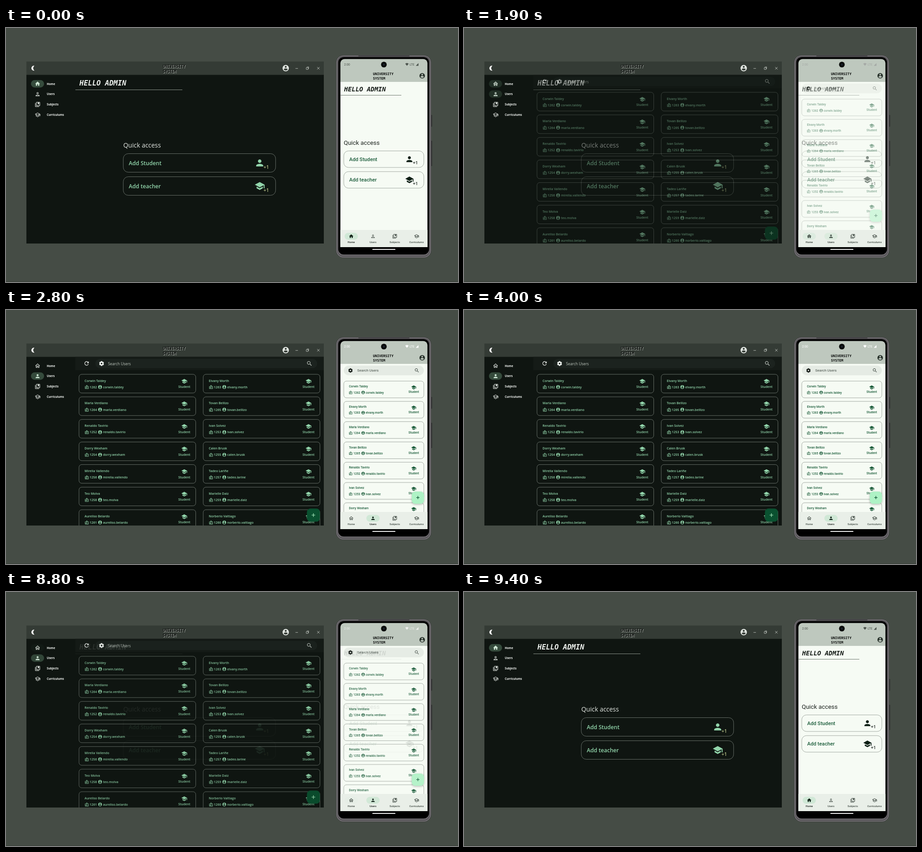
An HTML page with a canvas that plays this animation: 997 px wide and 561 px high, repeating every 9.5 s.

```html
<!DOCTYPE html>
<html lang="en">
<head>
<meta charset="utf-8">
<title>University System</title>
<style>
html, body { margin: 0; width: 100%; height: 100%; overflow: hidden; background: #454c45; }
canvas { display: block; width: 997px; height: 561px; }
</style>
</head>
<body>
<canvas id="stage"></canvas>
<script>
const W = 997, H = 561, LOOP = 9500, STEP = 100;
const dpr = window.devicePixelRatio || 1;
const SANS = '"Open Sans", "Noto Sans", sans-serif';
const ROBOTO = 'Roboto, sans-serif';
const MONO = '"DejaVu Sans Mono", monospace';

// Icons live in a 24-unit box and are filled with the even-odd rule.
const icons = {
  home: 'M10 20v-6h4v6h5v-8h3L12 3 2 12h3v8z',
  homeLine: 'M12 5.69l5 4.5V18h-2v-6H9v6H7v-7.81zM12 3L2 12h3v8h6v-6h2v6h6v-8h3z',
  person: 'M12 12c2.21 0 4-1.79 4-4s-1.79-4-4-4-4 1.79-4 4 1.79 4 4 4zm0 2c-2.67 0-8 1.34-8 4v2h16v-2c0-2.66-5.33-4-8-4z',
  personLine: 'M12 6c1.1 0 2 .9 2 2s-.9 2-2 2-2-.9-2-2 .9-2 2-2zm0 10c2.7 0 5.8 1.29 6 2H6c.23-.72 3.31-2 6-2zM12 4C9.79 4 8 5.79 8 8s1.79 4 4 4 4-1.79 4-4-1.79-4-4-4zm0 10c-2.67 0-8 1.34-8 4v2h16v-2c0-2.66-5.33-4-8-4z',
  books: 'M4 6H2v14c0 1.1.9 2 2 2h14v-2H4zM20 2H8c-1.1 0-2 .9-2 2v12c0 1.1.9 2 2 2h12c1.1 0 2-.9 2-2V4c0-1.1-.9-2-2-2zm0 14H8V4h12zM13 4h5v8l-2.5-1.5L13 12z',
  school: 'M5 13.18v4L12 21l7-3.82v-4L12 17zM12 3L1 9l11 6 9-4.91V17h2V9z',
  schoolLine: 'M12 3L1 9l4 2.18v6L12 21l7-3.82v-6l2-1.09V17h2V9zm6.82 6L12 12.72 5.18 9 12 5.28zM17 15.99l-5 2.73-5-2.73v-3.72L12 15l5-2.73z',
  account: 'M12 2a10 10 0 1 0 0 20 10 10 0 0 0 0-20zm0 3a3 3 0 1 1 0 6 3 3 0 0 1 0-6zm0 14.2c-2.5 0-4.71-1.28-6-3.22.03-1.99 4-3.08 6-3.08s5.97 1.09 6 3.08c-1.29 1.94-3.5 3.22-6 3.22z',
  search: 'M15.5 14h-.79l-.28-.27A6.5 6.5 0 1 0 13.73 14.43l.27.28v.79l5 4.99L20.49 19zM9.5 14a4.5 4.5 0 1 1 0-9 4.5 4.5 0 0 1 0 9z',
  refresh: 'M17.65 6.35A8 8 0 1 0 19.73 14h-2.08A6 6 0 1 1 16.22 7.78L13 11h7V4z',
  badge: 'M20 7h-5V4c0-1.1-.9-2-2-2h-2c-1.1 0-2 .9-2 2v3H4c-1.1 0-2 .9-2 2v11c0 1.1.9 2 2 2h16c1.1 0 2-.9 2-2V9c0-1.1-.9-2-2-2zM11 4h2v5h-2zM20 20H4V9h5c0 1.1.9 2 2 2h2c1.1 0 2-.9 2-2h5zM6 13h5v5H6zM14 13h4v1.5h-4zM14 16h4v1.5h-4z',
  moon: 'M15 3A9.3 9.3 0 1 0 15 21A11 11 0 0 1 15 3z',
  wifi: 'M12 21L1 7C7 1.5 17 1.5 23 7z',
  signal: 'M2 22h20V2z'
};
for (const key in icons) icons[key] = new Path2D(icons[key]);

const people = [
  ['Corwin Taldey', 1262], ['Elvany Morth', 1263],
  ['Marla Verdiano', 1264], ['Tovan Bellizo', 1265],
  ['Renaldo Tavirio', 1252], ['Ivan Solvez', 1253],
  ['Dorry Wexham', 1254], ['Calen Brusk', 1255],
  ['Mirelia Vallendo', 1256], ['Tadeo Lariñe', 1257],
  ['Teo Molva', 1258], ['Marielle Daiz', 1259],
  ['Aureliso Belardo', 1261], ['Norberio Valtiago', 1260]
];
const login = name => name.toLowerCase().replace(' ', '.').replace('ñ', 'n');
const tabs = [
  ['Home', 'home', 'homeLine'], ['Users', 'person', 'personLine'],
  ['Subjects', 'books', 'books'], ['Curriculums', 'school', 'schoolLine']
];

let ctx;

function sheet(canvas) {
  canvas.width = Math.round(W * dpr);
  canvas.height = Math.round(H * dpr);
  const c = canvas.getContext('2d');
  c.scale(dpr, dpr);
  return c;
}
function rect(x, y, w, h, color) {
  ctx.fillStyle = color;
  ctx.fillRect(x, y, w, h);
}
function box(x, y, w, h, r, fill, stroke, width = 0.8) {
  ctx.beginPath();
  ctx.roundRect(x, y, w, h, r);
  if (fill) { ctx.fillStyle = fill; ctx.fill(); }
  if (stroke) { ctx.strokeStyle = stroke; ctx.lineWidth = width; ctx.stroke(); }
}
function dot(x, y, r, color) {
  ctx.beginPath();
  ctx.arc(x, y, r, 0, Math.PI * 2);
  ctx.fillStyle = color;
  ctx.fill();
}
function line(color, width, ...pts) {
  ctx.beginPath();
  for (let i = 0; i < pts.length; i += 4) {
    ctx.moveTo(pts[i], pts[i + 1]);
    ctx.lineTo(pts[i + 2], pts[i + 3]);
  }
  ctx.strokeStyle = color;
  ctx.lineWidth = width;
  ctx.stroke();
}
function text(str, x, y, font, color, align = 'left') {
  ctx.font = font;
  ctx.fillStyle = color;
  ctx.textAlign = align;
  ctx.fillText(str, x, y);
}
function icon(name, cx, cy, size, color) {
  ctx.save();
  ctx.translate(cx - size / 2, cy - size / 2);
  ctx.scale(size / 24, size / 24);
  ctx.fillStyle = color;
  ctx.fill(icons[name], 'evenodd');
  ctx.restore();
}
function gear(cx, cy, size, color) {
  ctx.beginPath();
  ctx.arc(cx, cy, size * 0.24, 0, Math.PI * 2);
  ctx.strokeStyle = color;
  ctx.lineWidth = size * 0.2;
  ctx.stroke();
  for (let i = 0; i < 6; i++) {
    const a = i * Math.PI / 3 + Math.PI / 6, c = Math.cos(a) * size, s = Math.sin(a) * size;
    line(color, size * 0.23, cx + c * 0.26, cy + s * 0.26, cx + c * 0.41, cy + s * 0.41);
  }
}
function plus(cx, cy, r, color) {
  line(color, 1.2, cx - r, cy, cx + r, cy, cx, cy - r, cx, cy + r);
}
function clipped(x, y, w, h, r, draw) {
  ctx.save();
  ctx.beginPath();
  ctx.roundRect(x, y, w, h, r);
  ctx.clip();
  draw();
  ctx.restore();
}
function wordmark(x, y1, y2, size, color) {
  const small = `bold ${size}px ${MONO}`;
  text('UNIVERSITY', x, y1, small, color);
  text('SYSTEM', x, y2, small, color);
}

function quickCard(label, glyph, card, look) {
  const [x, y, w, h] = card;
  box(x, y, w, h, look.r, null, look.edge);
  text(label, x + 12, y + h / 2 + look.drop, look.font, look.ink);
  icon(glyph, look.iconX, y + h / 2, look.size, look.iconInk);
  text('+1', look.plusX, y + h / 2 + look.plusDrop, look.plusFont, look.plusInk);
}

function userCard(x, y, person, k) {
  box(x, y, k.w, k.h, 6, null, k.edge);
  const [name, id] = person;
  text(name, x + k.pad, y + k.row1, k.font, k.ink);
  icon('badge', x + k.badge, y + k.row2 - 2.5, k.small, k.ink);
  text(id, x + k.id, y + k.row2, k.font, k.ink);
  icon('account', x + k.acc, y + k.row2 - 2.5, k.small, k.ink);
  text(login(name), x + k.user, y + k.row2, k.font, k.ink);
  icon('school', x + k.right, y + k.capY, k.cap, k.ink);
  text('Student', x + k.right, y + k.role, k.font, k.ink, 'center');
}

function desktop(users) {
  const green = '#92d5ab', edge = '#7d867e';
  rect(45, 74, 656, 402, '#0f1511');
  rect(45, 74, 656, 29.5, '#343b35');
  icon('moon', 61, 88.8, 14, '#fff');
  wordmark(346.5, 88.7, 99.5, 8.3, '#b9c0b9');
  wordmark(345.7, 87.9, 98.7, 8.3, '#050706');
  icon('account', 617, 88.7, 17, '#dfe4df');
  line('#c0c6c0', 0.9, 638.5, 89.3, 644, 89.3, 686.3, 86.2, 691.7, 91.6, 691.7, 86.2, 686.3, 91.6);
  box(662.2, 87.4, 4.2, 4.2, 0.5, null, '#c0c6c0', 0.9);
  line('#c0c6c0', 0.9, 663.5, 86, 668, 86, 667.6, 86, 667.6, 90.5);

  tabs.forEach(([label, full, outline], i) => {
    const y = 123.2 + i * 22.85, on = i === (users ? 1 : 0);
    if (on) box(55, y - 8.2, 29, 16.4, 8.2, '#354b3c');
    icon(on ? full : outline, 69.7, y, 13, on ? '#d0e8d6' : '#e4e9e4');
    text(label, 90, y + 2.3, `700 6.2px ${SANS}`, '#f4f7f4');
  });

  if (!users) {
    text('HELLO ADMIN', 162, 127, `italic bold 15.6px ${MONO}`, '#eef2ee');
    line('#8b938a', 1, 153, 136.5, 389, 136.5);
    text('Quick access', 258.7, 263.7, `14px ${SANS}`, '#e4e9e4');
    const look = {
      r: 11, edge, drop: 5.3, font: `600 12.1px ${SANS}`, ink: green, iconX: 559.6, size: 23.5,
      iconInk: green, plusX: 568, plusDrop: 12.5, plusFont: `600 10.5px ${SANS}`, plusInk: '#b2bd85'
    };
    quickCard('Add Student', 'person', [258.7, 277.5, 336, 41], look);
    quickCard('Add teacher', 'school', [258.7, 328.5, 336, 41], look);
    return;
  }

  rect(153, 103.5, 548, 29.5, '#151b17');
  icon('refresh', 177.8, 118, 14, '#f0f4f0');
  box(197, 108, 489.5, 20.5, 10.2, '#1c231f');
  gear(210.8, 118.2, 13, '#f0f4f0');
  text('Search Users', 225, 121.9, `8.3px ${SANS}`, '#c0c9c0');
  icon('search', 669.3, 118.2, 14, '#c9d0c9');
  const k = {
    w: 257.5, h: 41.3, edge, ink: green, font: `600 7px ${SANS}`, pad: 12.3, row1: 16.5, row2: 30.7,
    badge: 17.3, id: 23.5, acc: 46.5, user: 53, small: 9.8, right: 232.2, cap: 13.8, capY: 15.4, role: 30.2
  };
  clipped(45, 133, 656, 343, 0, () => {
    people.forEach((p, i) => userCard(i % 2 ? 435 : 161, 142 + (i >> 1) * 49.85, p, k));
    box(663.7, 438.5, 28.8, 29, 8, '#0a5130');
    plus(678.1, 453, 4, '#aef2c5');
  });
}

function phone(users) {
  const ink = '#1c5d3b', dark = '#0d1f15', edge = '#8d958d';
  box(937, 192, 2.8, 26, 1, '#2b2c2c');
  box(937, 249, 2.8, 56, 1, '#2b2c2c');
  box(728, 60, 210, 447.5, 16, '#3c3b3d');
  box(728.8, 60.8, 208.4, 446, 15.5, '#817e82');
  box(730.3, 62, 205.4, 443.3, 14, '#4c4a4d');
  box(731.5, 63.2, 203, 440.3, 13, '#6a676b');
  box(732.8, 64.2, 200.4, 436, 12, '#000');
  box(777, 61.2, 113, 1.8, 0.8, '#353436');

  clipped(737.6, 68.5, 192, 415.5, [9, 9, 0, 0], () => {
    rect(737, 68, 193, 51, '#bec8be');
    rect(737, 119, 193, 327, '#f6fbf4');
    rect(737, 446, 193, 38, '#e9efe8');
    const status = users ? '#fff' : '#4b534c';
    text('2:00', 745.8, 83.1, `6.8px ${ROBOTO}`, status);
    icon('wifi', 884.4, 80.6, 8, status);
    text('LTE', 890.3, 83.1, `6.8px ${ROBOTO}`, status);
    icon('signal', 906.8, 80.5, 7.2, status);
    wordmark(809.5, 104.3, 114.2, 7.5, '#050706');
    icon('account', 918, 105.5, 14.6, '#29332c');

    if (users) phoneUsers(ink, edge);
    else phoneHome(ink, dark, edge);

    rect(737, 446, 193, 38, '#e9efe8');
    tabs.forEach(([label, full, outline], i) => {
      const x = 761.5 + i * 48, on = i === (users ? 1 : 0);
      if (on) box(x - 14.7, 452.5, 29.4, 15, 7.5, '#d0e8d6');
      icon(on ? full : outline, x, 460, 11.6, on ? dark : '#39433c');
      text(label, x, 475, `500 5.9px ${ROBOTO}`, on ? '#171d19' : '#3f4942', 'center');
    });
  });
  dot(833.5, 80.7, 6.3, '#080a09');
  dot(833.5, 80.7, 2, '#1c2430');
  box(808, 488, 51, 1.9, 1, '#f4f4f4');
}

function phoneHome(ink, dark, edge) {
  text('HELLO ADMIN', 745.8, 139.6, `italic bold 13.9px ${MONO}`, '#171d19');
  line('#6f786f', 1, 737, 148.5, 872, 148.5);
  text('Quick access', 745, 258.4, `13.4px ${ROBOTO}`, '#1d231f');
  const look = {
    r: 10.5, edge, drop: 4, font: `500 11.2px ${ROBOTO}`, ink, iconX: 889.8, size: 19.6,
    iconInk: dark, plusX: 897.5, plusDrop: 11.6, plusFont: `500 9.8px ${ROBOTO}`, plusInk: '#27302a'
  };
  quickCard('Add Student', 'person', [745, 271.5, 176.7, 36.5], look);
  quickCard('Add teacher', 'school', [745, 317.2, 176.7, 36.5], look);
}

function phoneUsers(ink, edge) {
  box(745, 122.8, 176.7, 21.4, 10.7, '#e5ebe4');
  gear(759.8, 133.5, 11.5, '#171d19');
  text('Search Users', 774.8, 136.3, `8px ${ROBOTO}`, '#3f4942');
  icon('search', 906.3, 133.5, 12, '#39433c');
  const k = {
    w: 176.7, h: 37, edge, ink, font: `500 6.65px ${ROBOTO}`, pad: 11.4, row1: 14.2, row2: 27.5,
    badge: 15.3, id: 21.3, acc: 42.7, user: 48.3, small: 8.7, right: 154.3, cap: 12, capY: 13.9, role: 26.4
  };
  people.slice(0, 7).forEach((p, i) => userCard(745, 157 + i * 44.8, p, k));
  ctx.save();
  ctx.shadowColor = 'rgba(0,0,0,.28)';
  ctx.shadowBlur = 4 * dpr;
  ctx.shadowOffsetY = 1.5 * dpr;
  box(895, 401, 27, 27, 7.5, '#aef2c5');
  ctx.restore();
  plus(908.5, 414.3, 3.5, '#0a5130');
}

function scene(users) {
  const canvas = document.createElement('canvas');
  ctx = sheet(canvas);
  rect(0, 0, W, H, '#454c45');
  rect(0, 560, W, 1, '#373d37');
  desktop(users);
  phone(users);
  return canvas;
}

const stage = document.getElementById('stage');
const out = sheet(stage);
const home = scene(false), list = scene(true);
const ramp = (t, from, to) => Math.min(1, Math.max(0, (t - from) / (to - from)));

function frame(now) {
  const t = Math.floor((now % LOOP) / STEP) * STEP;
  const mix = ramp(t, 1440, 2360) - ramp(t, 8740, 9340);
  out.globalAlpha = 1;
  out.drawImage(home, 0, 0, W, H);
  out.globalAlpha = mix;
  out.drawImage(list, 0, 0, W, H);
  requestAnimationFrame(frame);
}
frame(performance.now());
</script>
</body>
</html>
```
